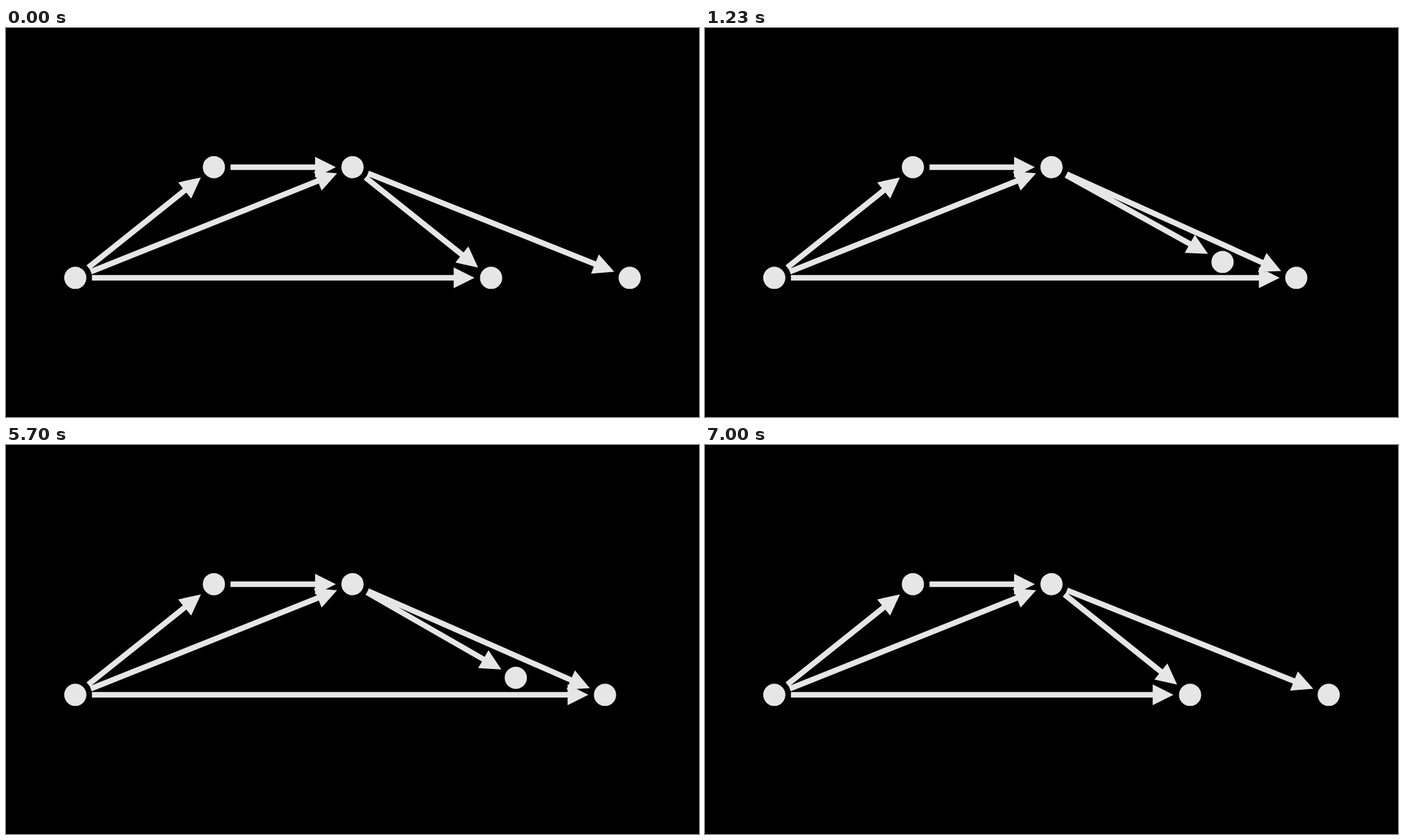
An HTML page that plays this animation: 998 px wide and 561 px high, repeating every 10 s.

```html
<!DOCTYPE html>
<html lang="en">
<head>
<meta charset="utf-8">
<title>Graph layout swap</title>
<style>
  html, body { margin: 0; width: 100%; height: 100%; overflow: hidden; background: #000; }
  svg { display: block; width: 100%; height: 100%; }
  #dots, #heads { fill: #e6e6e6; }
  #shafts { fill: none; stroke: #e6e6e6; stroke-width: 7.98; }
</style>
</head>
<body>
<svg viewBox="0 0 998 561">
  <path id="shafts"/>
  <path id="heads"/>
  <path id="dots"/>
</svg>
<script>
  const UNIT = 199.6, CX = 499, CY = 280.5;
  const RADIUS = 0.08 * UNIT, GAP = 0.12 * UNIT, HEAD = 0.15 * UNIT;
  const LOOP = 10000, MOVE = 2000, BACK = 5000;
  const EDGES = ["AB", "BC", "AC", "AD", "CD", "CE"];

  const [shafts, heads, dots] = ["shafts", "heads", "dots"].map(id => document.getElementById(id));
  const at = (x, y) => [CX + x * UNIT, CY - y * UNIT];
  const pt = (x, y) => x.toFixed(3) + " " + y.toFixed(3);

  // Logistic ease, rescaled to run exactly from 0 to 1
  const sigmoid = x => 1 / (1 + Math.exp(-x));
  function ease(u) {
    const low = sigmoid(-5);
    u = Math.min(1, Math.max(0, u));
    return (sigmoid(10 * (u - 0.5)) - low) / (1 - 2 * low);
  }

  // 30 steps per second, with starts rounded to 10 ms
  const stepTime = ms => Math.floor((Math.floor(ms / 10) + 0.4) * 0.3) * 100 / 3;

  function arrow([x1, y1], [x2, y2]) {
    const len = Math.hypot(x2 - x1, y2 - y1);
    const dx = (x2 - x1) / len, dy = (y2 - y1) / len;
    const along = (d, side = 0) => pt(x1 + dx * d - dy * side, y1 + dy * d + dx * side);
    const tip = len - GAP, base = tip - HEAD;
    return {
      shaft: `M${along(GAP)}L${along(base + 1)}`,
      head: `M${along(tip)}L${along(base, HEAD / 2)}L${along(base, -HEAD / 2)}Z`
    };
  }

  const dot = ([x, y]) =>
    `M${pt(x - RADIUS, y)}a${RADIUS} ${RADIUS} 0 1 0 ${2 * RADIUS} 0a${RADIUS} ${RADIUS} 0 1 0 ${-2 * RADIUS} 0Z`;

  function draw(ms) {
    const t = stepTime(ms);
    const p = t < BACK ? ease(t / MOVE) : 1 - ease((t - BACK) / MOVE);
    const nodes = {
      A: at(-2, -0.4),
      B: at(-1, 0.4),
      C: at(0, 0.4),
      D: at(1 + p, -0.4),
      E: at(2 - p, -0.4 + 0.15 * p)
    };
    const arrows = EDGES.map(([from, to]) => arrow(nodes[from], nodes[to]));
    shafts.setAttribute("d", arrows.map(a => a.shaft).join(""));
    heads.setAttribute("d", arrows.map(a => a.head).join(""));
    dots.setAttribute("d", Object.values(nodes).map(dot).join(""));
  }

  const start = performance.now();
  function tick() {
    draw((performance.now() - start) % LOOP);
    requestAnimationFrame(tick);
  }
  tick();
</script>
</body>
</html>
```
